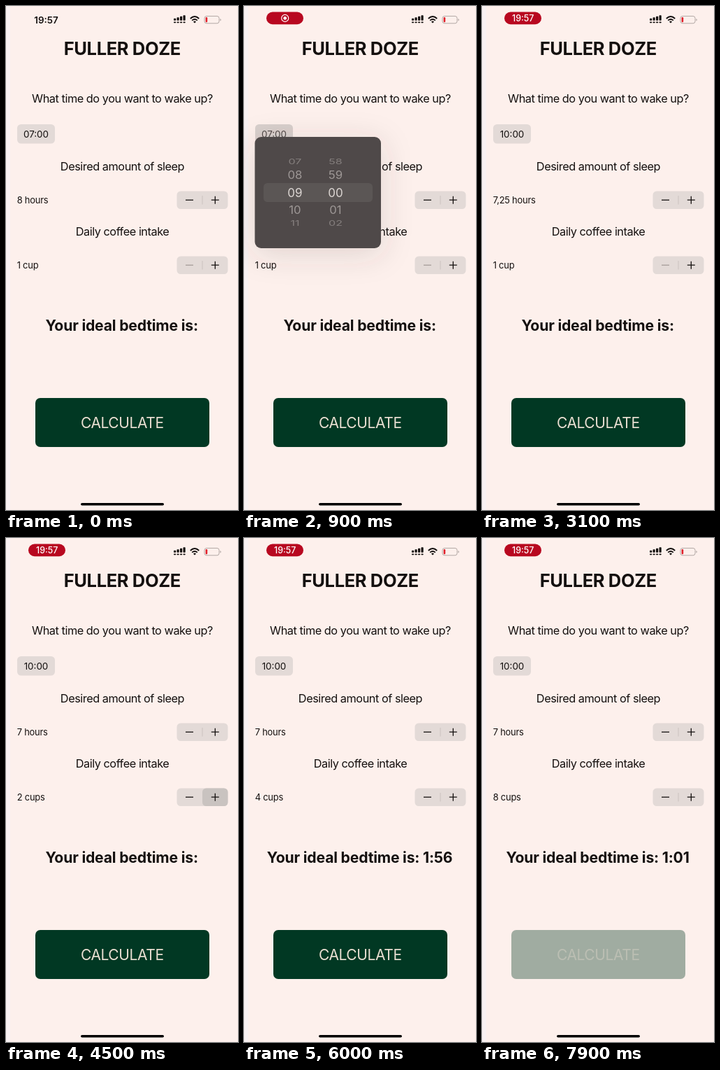
An HTML page for the animation above (8 s loop, 332 by 720 pixels).

```html
<!DOCTYPE html>
<html lang="en">
<head>
<meta charset="utf-8">
<title>Bedtime calculator</title>
<style>
  html, body { margin: 0; width: 100%; height: 100%; overflow: hidden; background: #fdf0ec; }
  svg { display: block; width: 332px; height: 720px; }
  text { font-family: Inter, "Liberation Sans", sans-serif; fill: #14100f; white-space: pre; }
  .mid { text-anchor: middle; }
  .title { font-size: 25.5px; font-weight: 700; letter-spacing: -.37px; }
  .question { font-size: 16.3px; letter-spacing: -.46px; }
  .value { font-size: 12.9px; letter-spacing: -.22px; }
  .chip { font-size: 13.4px; }
  .result { font-size: 21.2px; font-weight: 700; letter-spacing: -.2px; }
  .calc { font-size: 21px; letter-spacing: -.4px; fill: #eadfd2; }
  .wheel { font-size: 17px; fill: #dcd6d3; }
</style>
</head>
<body>
<svg viewBox="0 0 332 720">
  <defs>
    <filter id="shadow" x="-50%" y="-60%" width="200%" height="220%">
      <feDropShadow dx="0" dy="8" stdDeviation="22" flood-color="#4a3c38" flood-opacity=".16"/>
    </filter>
  </defs>
  <rect width="332" height="720" fill="#fdf0ec"/>
  <rect width="6" height="720" fill="#f8f1f2"/>

  <text id="clock" class="mid" x="57.5" y="24.7" font-size="13.4" font-weight="600">19:57</text>
  <g id="pill">
    <rect x="32" y="8.6" width="53" height="17.6" rx="8.8" fill="#b80820"/>
    <text id="pillTime" class="mid" x="58.7" y="21.9" font-size="12.4" font-weight="500" style="fill:#fff">19:57</text>
    <g id="record" fill="none" stroke="#fff" stroke-width="1.2">
      <circle cx="58.7" cy="17.4" r="5"/>
      <circle cx="58.7" cy="17.4" r="2.4" fill="#fff" stroke="none"/>
    </g>
  </g>
  <g id="signal" fill="#14100f"></g>
  <g fill="none" stroke="#14100f" stroke-width="1.9">
    <path d="M263.8 18Q270 12.2 276.2 18M266.2 20.6Q270 17.2 273.8 20.6"/>
    <path d="M268 22.4Q270 20.8 272 22.4L270 24.5Z" fill="#14100f" stroke="none"/>
  </g>
  <rect x="284" y="14.5" width="21" height="10.3" rx="3" fill="none" stroke="#b3a9a6"/>
  <path d="M306.4 18v3.4q1.4-.6 1.4-1.7t-1.4-1.7" fill="#b3a9a6"/>
  <rect x="285.6" y="16" width="2.6" height="7.3" rx="1.2" fill="#e0222c"/>

  <text class="title mid" x="166.3" y="70.3">FULLER DOZE</text>
  <text class="question mid" x="166.5" y="138">What time do you want to wake up?</text>
  <rect id="chipBox" x="16" y="169" width="54" height="27.5" rx="5.5" fill="#e3dad7"/>
  <text id="wake" class="chip mid" x="43" y="187.6"></text>
  <text class="question mid" x="166.5" y="235">Desired amount of sleep</text>
  <text id="sleep" class="value" x="15.7" y="281.7"></text>
  <text class="question mid" x="166.5" y="328">Daily coffee intake</text>
  <text id="cups" class="value" x="15.7" y="374.8"></text>
  <g id="steppers"></g>
  <text id="result" class="result mid" x="165.6" y="464"></text>
  <g>
    <rect id="button" x="42" y="560" width="249" height="70" rx="7" fill="#013823"/>
    <text id="buttonText" class="calc mid" x="166.3" y="602.5">CALCULATE</text>
  </g>
  <rect x="107" y="710" width="119" height="3.6" rx="1.8" fill="#000"/>

  <g id="picker">
    <rect x="15.5" y="187" width="180.5" height="159" rx="9" fill="#4f4a49" filter="url(#shadow)"/>
    <rect x="28" y="253" width="156" height="27" rx="5.5" fill="#5b5655"/>
    <g id="wheels"></g>
  </g>
</svg>
<script>
const LOOP = 8000, STEP = 100;
const el = id => document.getElementById(id);

function add(parent, tag, attrs) {
  const node = document.createElementNS('http://www.w3.org/2000/svg', tag);
  for (const key in attrs) node.setAttribute(key, attrs[key]);
  return parent.appendChild(node);
}

const show = (node, on) => node.setAttribute('visibility', on ? 'visible' : 'hidden');
const clamp = v => Math.max(0, Math.min(1, v));
const easeOut = v => 1 - (1 - clamp(v)) ** 2;
const ramp = (t, start, length) => easeOut((t - start) / length);
const count = (t, times) => times.filter(at => t >= at).length;
const held = (t, times) => times.some(at => t >= at && t < at + 150);

for (let i = 0; i < 4; i++) {
  const x = 240 + i * 4.5, h = 3 + i * 1.5;
  add(el('signal'), 'rect', { x, y: 20.8 - h, width: 3.2, height: h, rx: .8 });
  add(el('signal'), 'rect', { x, y: 22.4, width: 3.2, height: 1.8, rx: .8 });
}

function makeStepper(y) {
  const g = add(el('steppers'), 'g', { transform: `translate(244.5 ${y})`, stroke: '#14100f', 'stroke-width': 1.3 });
  const box = { height: 25.5, rx: 5.5, stroke: 'none' };
  add(g, 'rect', { ...box, width: 73, fill: '#e3dad7' });
  const divider = add(g, 'path', { d: 'M36.5 6.5v12.5', stroke: '#cbc2bf', 'stroke-width': 1 });
  const left = add(g, 'rect', { ...box, width: 36.5, fill: '#c9c3c0' });
  const right = add(g, 'rect', { ...box, x: 36.5, width: 36.5, fill: '#c9c3c0' });
  const minus = add(g, 'path', { d: 'M12.5 12.7h11' });
  add(g, 'path', { d: 'M49.3 12.7h11M54.8 7.2v11' });
  return (down, up, canLower) => {
    show(left, down);
    show(right, up);
    show(divider, !down && !up);
    minus.setAttribute('stroke', canLower ? '#14100f' : '#a59c99');
  };
}
const sleepStepper = makeStepper(264.5);
const cupStepper = makeStepper(357.5);

// Items sit on a cylinder seen from the side.
function makeWheel(x, size) {
  const items = Array.from({ length: 7 }, () => add(el('wheels'), 'text', { class: 'wheel mid', y: 6.1 }));
  return position => items.forEach((item, i) => {
    const value = Math.round(position) + i - 3;
    const angle = (value - position) * .455;
    const depth = Math.cos(angle);
    item.textContent = String((value + size) % size).padStart(2, '0');
    item.setAttribute('transform', `translate(${x} ${266.5 + 56 * Math.sin(angle)}) scale(${.86 + .14 * depth} ${Math.max(0, depth)})`);
    item.setAttribute('opacity', depth < .45 ? 0 : Math.abs(angle) < .2 ? 1 : .62 * depth);
  });
}
const hourWheel = makeWheel(73, 24);
const minuteWheel = makeWheel(131, 60);

const sleepTaps = [2100, 2400, 2700, 3300];
const cupTaps = [4400, 4600, 4800, 6700, 7300, 7450, 7600];
const presses = [[5000, 5100], [7770, 7870]];

function buttonOpacity(t) {
  const press = presses.find(([down]) => t >= down && t < down + 600);
  if (!press) return 1;
  const [down, up] = press;
  return t < up ? 1 - .8 * ramp(t, down - 40, 80) : .2 + .8 * ramp(t, up, 270);
}

function render(t) {
  const recording = t >= 200;
  show(el('clock'), !recording);
  show(el('pill'), recording);
  el('pillTime').setAttribute('opacity', t >= 2000 ? 1 : 0);
  el('record').setAttribute('opacity', t >= 2000 ? 0 : 1);

  const open = ramp(t, 250, 250) * (1 - ramp(t, 1550, 250));
  const scale = .3 + .7 * open;
  show(el('picker'), open > 0);
  el('picker').setAttribute('opacity', open);
  el('picker').setAttribute('transform', `translate(43 187) scale(${scale}) translate(-43 -187)`);
  hourWheel(7 + 2 * ramp(t, 450, 450) + ramp(t, 1000, 400));
  minuteWheel(0);
  el('wake').textContent = t < 1500 ? '07:00' : '10:00';
  el('wake').setAttribute('opacity', 1 - .3 * open);
  el('chipBox').setAttribute('fill', open > .5 ? '#d8cfcc' : '#e3dad7');

  const hours = 8 - count(t, sleepTaps) / 4;
  const cups = 1 + count(t, cupTaps);
  el('sleep').textContent = `${String(hours).replace('.', ',')} hours`;
  el('cups').textContent = cups + (cups > 1 ? ' cups' : ' cup');
  sleepStepper(held(t, sleepTaps), false, true);
  cupStepper(false, held(t, cupTaps), cups > 1);

  const bedtime = ['', ' 1:56', ' 1:01'][count(t, presses.map(p => p[1]))];
  el('result').textContent = 'Your ideal bedtime is:' + bedtime;
  const opacity = buttonOpacity(t);
  el('button').setAttribute('opacity', opacity);
  el('buttonText').setAttribute('opacity', opacity);
}

const start = performance.now();
function tick() {
  const t = (performance.now() - start) % LOOP;
  render(Math.floor(t / STEP) * STEP);
  requestAnimationFrame(tick);
}
tick();
</script>
</body>
</html>
```
